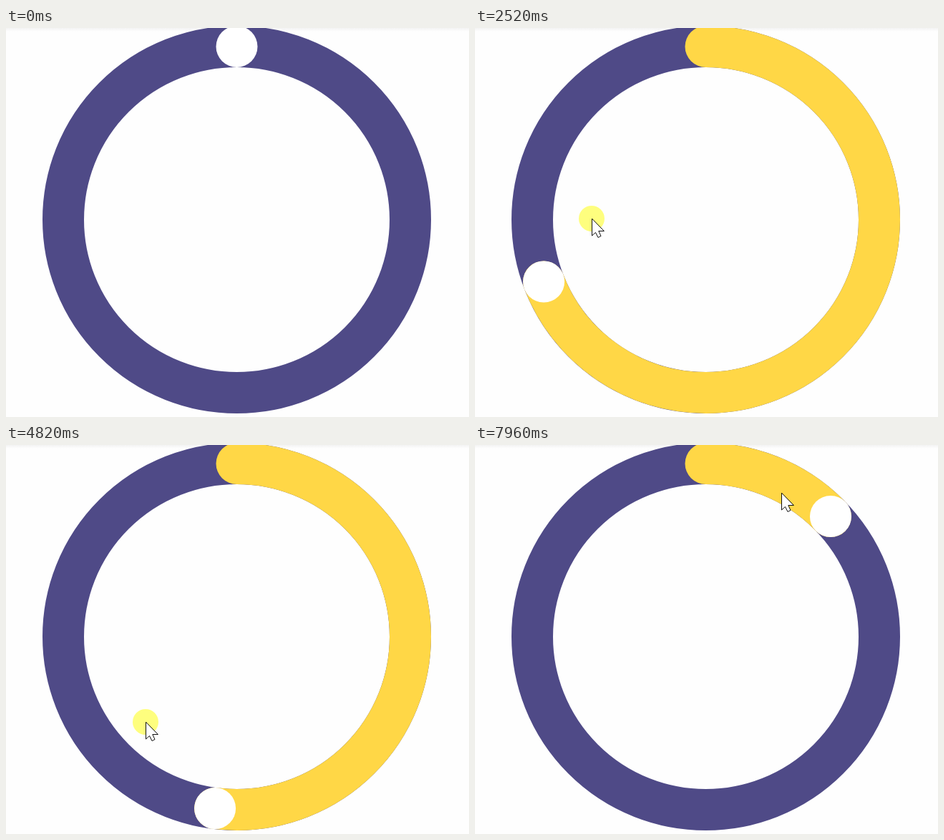
An HTML page with a canvas that plays this animation: 647x545 px, repeating every 8 s.

```html
<!DOCTYPE html>
<html lang="en">
<head>
<meta charset="utf-8">
<title>Circular slider</title>
<style>
html, body { margin: 0; width: 100%; height: 100%; overflow: hidden; background: #fefefe; }
canvas { display: block; }
</style>
</head>
<body>
<canvas id="stage" width="647" height="545"></canvas>
<script>
const ctx = document.getElementById('stage').getContext('2d');
const LOOP = 8000, STEP = 67.85, START = 260;
const CX = 322.5, CY = 268.5, RADIUS = 242.5, WIDTH = 58;
const BLUE = '#4f4a87', YELLOW = '#ffd746';

const snap = t => Math.floor((t - START) / STEP);

// Turning points of the drags: [time, knob angle, pointer angle, pointer radius],
// in degrees clockwise from the top.
const poses = [
  [START, 0, 170, 130.5],
  [1010, 0, 6.8, 199],
  [1210, 0, 6.8, 199],
  [1970, 61.8, 66.8, 209.4],
  [2520, 249, 270.5, 159.5],
  [2860, 360, 364, 229],
  [3450, 360, 364, 229],
  [4200, 86.6, 69.7, 223.4],
  [4340, 0, 4, 229],
  [4540, 0, 4, 229],
  [4750, 135, 170, 160],
  [5090, 360, 404.9, 301.2],
  [5690, 360, 404.9, 301.2],
  [6440, 330, 326, 217],
  [7130, 237, 180.8, 189.5],
  [7270, 171, 158, 169],
  [7960, 46, 27.6, 227.4]
];
const presses = [[1210, 2860], [3450, 4340], [4540, 5090]];

// Monotone cubic through one column of the poses.
function track(col) {
  const xs = poses.map(p => snap(p[0])), ys = poses.map(p => p[col]);
  const last = xs.length - 1;
  const slope = i => (ys[i + 1] - ys[i]) / (xs[i + 1] - xs[i]);
  const tangent = i => {
    if (i === 0 || i === last) return 0;
    const a = slope(i - 1), b = slope(i);
    return a * b <= 0 ? 0 : 2 * a * b / (a + b);
  };
  return x => {
    if (x <= xs[0]) return ys[0];
    if (x >= xs[last]) return ys[last];
    let i = 0;
    while (x >= xs[i + 1]) i++;
    const h = xs[i + 1] - xs[i], u = (x - xs[i]) / h, v = 1 - u;
    return ys[i] * v * v * (1 + 2 * u) + ys[i + 1] * u * u * (3 - 2 * u)
      + h * u * v * (tangent(i) * v - tangent(i + 1) * u);
  };
}

const [knobAt, angleAt, reachAt] = [1, 2, 3].map(track);

function polar(degrees, r) {
  const a = degrees * Math.PI / 180;
  return [CX + r * Math.sin(a), CY - r * Math.cos(a)];
}

function ring(color, degrees) {
  ctx.beginPath();
  ctx.arc(CX, CY, RADIUS, -Math.PI / 2, (degrees - 90) * Math.PI / 180);
  ctx.strokeStyle = color;
  ctx.lineWidth = WIDTH;
  ctx.lineCap = 'round';
  ctx.stroke();
}

function disc([x, y], r, color) {
  ctx.beginPath();
  ctx.arc(x, y, r, 0, Math.PI * 2);
  ctx.fillStyle = color;
  ctx.fill();
}

const arrow = new Path2D('M.5 .5V24L5.5 19.5L9 26.5L13 24.5L9.8 17.5H17Z');

function pointer(tip, pressed) {
  if (pressed) disc(tip, 18, 'rgba(255,255,0,.5)');
  ctx.save();
  ctx.translate(...tip);
  ctx.fillStyle = '#fff';
  ctx.fill(arrow);
  ctx.strokeStyle = '#111';
  ctx.lineWidth = 1;
  ctx.stroke(arrow);
  ctx.restore();
}

function background() {
  const shade = ctx.createLinearGradient(0, 0, 0, 5);
  shade.addColorStop(0, '#f3f3f3');
  shade.addColorStop(1, '#fefefe');
  ctx.fillStyle = shade;
  ctx.fillRect(0, 0, 647, 545);
}

function draw(time) {
  const step = snap(time), degrees = knobAt(step);
  background();
  ring(BLUE, 360);
  if (degrees > 0.5) ring(YELLOW, degrees);
  disc(polar(degrees, RADIUS), WIDTH / 2, '#fff');
  if (step >= 0) {
    const tip = polar(angleAt(step), reachAt(step)).map(Math.round);
    pointer(tip, presses.some(([from, to]) => step >= snap(from) && step < snap(to)));
  }
}

const origin = performance.now();
function tick() {
  draw((performance.now() - origin) % LOOP);
  requestAnimationFrame(tick);
}
tick();
</script>
</body>
</html>
```
